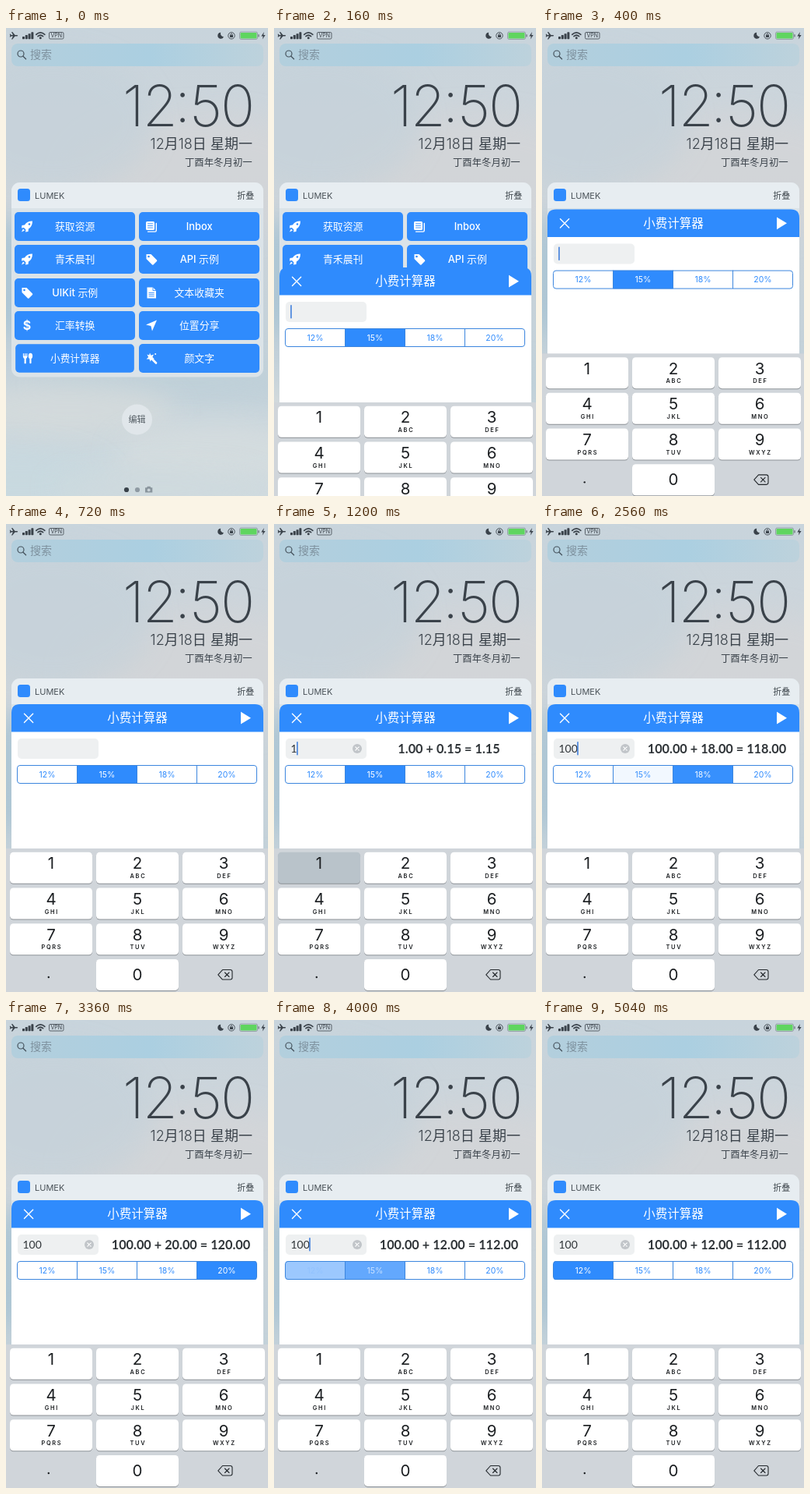
An HTML page that plays this animation: 337 px wide and 600 px high, repeating every 5120 ms.

```html
<!DOCTYPE html>
<html lang="zh-CN">
<head>
<meta charset="utf-8">
<style>
html, body { margin: 0; width: 100%; height: 100%; overflow: hidden; background: #cbd3d9; }
svg { display: block; width: 337px; height: 600px; font-family: Inter, "Noto Sans CJK SC", "Noto Sans CJK", sans-serif; }
.lato { font-family: Lato, "Noto Sans CJK SC", sans-serif; }
</style>
</head>
<body>
<svg id="stage" viewBox="0 0 337 600"></svg>
<script>
const BLUE = '#2f8bfd', INK = '#3a424a', LOOP = 5120, STEP = 80;
const stage = document.getElementById('stage');
const $ = id => document.getElementById(id);

const text = (x, y, size, s, fill = INK, attrs = '') =>
  `<text x="${x}" y="${y}" font-size="${size}" fill="${fill}" ${attrs}>${s}</text>`;
const mid = (x, y, size, s, fill, attrs = '') =>
  text(x, y, size, s, fill, 'text-anchor="middle" ' + attrs);
const end = (x, y, size, s, fill, attrs = '') =>
  text(x, y, size, s, fill, 'text-anchor="end" ' + attrs);
const rect = (x, y, w, h, r, fill, attrs = '') =>
  `<rect x="${x}" y="${y}" width="${w}" height="${h}" rx="${r}" fill="${fill}" ${attrs}/>`;
const path = (d, fill = 'none', attrs = '') => `<path d="${d}" fill="${fill}" ${attrs}/>`;
const circle = (x, y, r, fill, attrs = '') =>
  `<circle cx="${x}" cy="${y}" r="${r}" fill="${fill}" ${attrs}/>`;
const line = (d, color, w = 1) =>
  path(d, 'none', `stroke="${color}" stroke-width="${w}" stroke-linecap="round" stroke-linejoin="round"`);

// Soft sky: [cx, cy, rx, ry, colour, opacity]
const clouds = [
  [0, 320, 60, 75, '#a5c2d3', .7], [250, 190, 170, 80, '#d4d5d8', .7],
  [60, 120, 130, 90, '#c5d2da', .7], [230, 455, 190, 22, '#bccfd8', .7],
  [80, 490, 140, 34, '#d6dbdc', .8], [270, 545, 130, 40, '#d6dddf', .8],
  [20, 580, 110, 40, '#c6d9e0', .7], [200, 590, 140, 26, '#cfdade', .8]
];
const sky = () => `<defs>
  <linearGradient id="sky" x2="0" y2="1">
    <stop stop-color="#c8d4dc"/><stop offset=".3" stop-color="#cfd5da"/>
    <stop offset=".7" stop-color="#c3d1d9"/><stop offset="1" stop-color="#cfdadf"/>
  </linearGradient>
  <linearGradient id="search">
    <stop stop-color="#b3cfdd"/><stop offset=".55" stop-color="#abcfe1"/><stop offset="1" stop-color="#bdd2dc"/>
  </linearGradient>
  <filter id="soft" x="-50%" y="-100%" width="200%" height="300%"><feGaussianBlur stdDeviation="16"/></filter>
  <clipPath id="card">${rect(7, 198, 324, 249.5, 11, '#fff')}</clipPath>
  <clipPath id="pill">${rect(14.5, 309, 308.5, 24, 3.5, '#fff')}</clipPath>
  </defs>` + rect(0, 0, 337, 600, 0, 'url(#sky)') +
  clouds.map(([x, y, rx, ry, c, o]) =>
    `<ellipse cx="${x}" cy="${y}" rx="${rx}" ry="${ry}" fill="${c}" opacity="${o}" filter="url(#soft)"/>`).join('');

const statusBar = () =>
  path('M5 9 L9 9 L7 5 H8.3 L11.6 9 H14.5 Q16 9.7 14.5 10.4 H11.6 L8.3 14.4 H7 L9 10.4 H6.8 L5.7 11.6 H4.8 L5.3 9.7 L4.8 7.8 H5.7 L6.8 9Z', INK) +
  [0, 1, 2, 3].map(i => rect(21 + i * 3.8, 11 - i * 1.9, 3, 3.2 + i * 1.9, .6, INK)).join('') +
  line('M38.8 8.4 Q44.3 3.4 49.8 8.4 M41 10.7 Q44.3 7.8 47.6 10.7', INK, 1.7) + circle(44.3, 12.8, 1.5, INK) +
  rect(55.5, 5.5, 18.5, 8.5, 1.5, 'none', `stroke="${INK}" stroke-width=".8"`) +
  mid(64.8, 12.4, 7, 'VPN', INK) +
  path('M276.2 5.8 A4 4 0 1 0 280 11.3 A4.1 4.1 0 0 1 276.2 5.8Z', INK) +
  circle(290, 9.8, 4.2, 'none', `stroke="${INK}" stroke-width=".9"`) + rect(288, 9, 4, 3, .5, INK) +
  line('M288.8 9 V8 Q290 6.4 291.2 8 V9', INK, .8) +
  rect(300.5, 5, 23, 9.5, 2, 'none', `stroke="${INK}" stroke-width=".7" opacity=".5"`) +
  rect(301.5, 6, 21, 7.5, 1.2, '#5fd55f') + rect(324.3, 8, 1.4, 3.6, .7, INK, 'opacity=".6"') +
  path('M332 5 L328.3 10.4 H330.7 L329.8 14.6 L333.6 9 H331.1Z', INK);

const clock = 'font-weight="160" letter-spacing="-2"';
const lockScreen = () =>
  rect(7, 20, 324, 29, 8, 'url(#search)') +
  circle(19, 33, 4, 'none', 'stroke="#46535d" stroke-width="1.2"') + line('M22 36.2 L25.6 39.8', '#46535d', 1.3) +
  text(31, 39, 14, '搜索', '#7e919e') +
  mid(184.5, 126, 73, '12', INK, clock) +
  mid(227, 121, 73, ':', INK, 'font-weight="160"') +
  mid(277.5, 126, 73, '50', INK, clock) +
  end(316.9, 155, 18, '12月18日 星期一', INK, 'font-weight="350"') +
  end(316.7, 177, 12.4, '丁酉年冬月初一') +
  circle(168.5, 502, 19.5, '#e3e9ed', 'opacity=".85"') + mid(168.5, 506, 11, '编辑', '#515a61') +
  circle(155, 592, 3.1, '#39424a') + circle(169, 592, 3.1, '#8f9aa3') +
  path('M179 589.3 H181 L182 587.8 H185.5 L186.5 589.3 H188.3 V595.5 H179Z', '#8a959d') +
  circle(183.7, 592.3, 1.9, '#cbd4d9');

// Icons are drawn around (0, 0)
const W = '#fff';
const icons = {
  rocket: path('M7 -7 Q0 -7 -3 -2 L-6.5 -1.5 L-7 2 L-4 1.5 L-1.5 4 L-2 7 L1.5 6.5 L2 3 Q7 0 7 -7Z M-5 3 L-7 7 L-3 5Z', W) + circle(3, -3, 1.3, BLUE),
  inbox: rect(-7, -6.5, 11, 11, 1.5, W) + line('M6.3 -4 V5 Q6.3 6.6 4.7 6.6 H-4.5', W, 1.4) +
    line('M-4.5 -3.6 H1.5 M-4.5 -1 H1.5 M-4.5 1.6 H1.5', BLUE, .9),
  tag: path('M-6.5 -6.5 H-.5 L7 1 Q7.6 1.8 7 2.5 L2.5 7 Q1.8 7.6 1 7 L-6.5 -.5Z', W) + circle(-3.5, -3.5, 1.3, BLUE),
  doc: path('M-5.5 -7 H2 L6 -3 V7 H-5.5Z', W) + line('M2 -6.8 V-2.9 H5.8 M-3 0 H3.3 M-3 2.2 H3.3 M-3 4.4 H3.3', BLUE, .9),
  dollar: mid(0, 5.6, 16, '$', W, 'font-weight="700"'),
  arrow: path('M7 -7 L1 7 L-.6 .6 L-7 -1Z', W),
  cutlery: line('M-5.5 -6 V-2 M-3.3 -6 V-2 M-1.1 -6 V-2', W, 1.2) + path('M-6.1 -3 H-.5 Q-.6 0 -2.2 .4 V6.8 H-4.4 V.4 Q-6 0 -6.1 -3Z', W) +
    '<ellipse cx="3.6" cy="-3" rx="2.7" ry="3.8" fill="#fff"/>' + rect(2.5, 0, 2.2, 6.8, 1, W),
  wand: line('M0 0 L6 6', W, 2.6) + path('M-2 -7 L-.5 -3.8 L3 -5 L1.4 -1.6 L4 .8 L.3 .7 L-1.2 4.2 L-2.6 .9 L-6.4 1 L-3.8 -1.6 L-5.6 -5 L-2.8 -3.9Z', W) + circle(5.2, -5.5, 1, W)
};
const actions = [
  ['rocket', '获取资源'], ['inbox', 'Inbox'], ['rocket', '青禾晨刊'], ['tag', 'API 示例'],
  ['tag', 'UIKit 示例'], ['doc', '文本收藏夹'], ['dollar', '汇率转换'], ['arrow', '位置分享'],
  ['cutlery', '小费计算器'], ['wand', '颜文字']
];
const button = ([icon, label], i) => {
  const x = i % 2 ? 248.5 : 88.5, y = 254.5 + Math.round((i >> 1) * 42.35);
  return `<g transform="translate(${x} ${y})${i === 8 ? ' scale(.985)' : ''}">` +
    rect(-77.5, -18.5, 155, 37, 5, BLUE) +
    `<g transform="translate(-61.5 0)">${icons[icon]}</g>` +
    mid(.2, 4.8, 12.9, label, W, 'font-weight="500"') + '</g>';
};
const widget = () =>
  `<g clip-path="url(#card)">${rect(7, 198, 324, 250, 0, '#dbe3e8')}${rect(7, 198, 324, 33, 0, '#e7edf1')}</g>` +
  rect(15, 206, 16, 16, 3.5, BLUE) + text(37, 218.5, 11, 'LUMEK', '#4a5258') +
  end(319.3, 218.5, 11, '折叠', '#3f474d') + actions.map(button).join('');

const rates = [12, 15, 18, 20], segW = 77;
const sheet = () => '<g id="sheet">' +
  rect(7, 260, 324, 340, 0, W) +
  path('M7 266.5 V242 Q7 231 18 231 H320 Q331 231 331 242 V266.5Z', BLUE) +
  line('M23.5 243.2 L34.7 254.4 M34.7 243.2 L23.5 254.4', W, 1.4) +
  mid(169, 254.4, 15.5, '小费计算器', W, 'font-weight="500"') +
  path('M302 240.8 L315 248.7 L302 256.6Z', W) +
  rect(15, 275, 104, 26, 5, '#eef0f1') +
  text(21.5, 293, 14, '', '#2f3438', 'id="amount" class="lato"') +
  rect(21, 279, 1.6, 17.5, .8, '#3f7fdc', 'id="caret"') +
  `<g id="clear">${circle(107, 288, 6, '#c1c5c9')}${line('M104.8 285.8 L109.2 290.2 M109.2 285.8 L104.8 290.2', W, 1.2)}</g>` +
  mid(225, 294.3, 16.3, '', '#2f3438', 'id="sum" class="lato" font-weight="700"') +
  '<g clip-path="url(#pill)">' + rates.map((r, i) => rect(14.5 + i * segW, 309, segW, 24, 0, BLUE, `id="seg${i}"`)).join('') + '</g>' +
  rect(14.5, 309.5, 308, 23, 3.5, 'none', 'stroke="#3c86de"') +
  [1, 2, 3].map(i => line(`M${14.5 + i * segW} 309.5 V332`, '#3c86de')).join('') +
  rates.map((r, i) => mid(53 + i * segW, 324.6, 10.5, r + '%', BLUE, `id="rate${i}"`)).join('') +
  '</g>';

const letters = ['', 'ABC', 'DEF', 'GHI', 'JKL', 'MNO', 'PQRS', 'TUV', 'WXYZ'];
const key = (digit, col, row, sub) => {
  const x = 5 + col * 111, y = 420.8 + row * 45.7;
  return rect(x, y + 1, 106, 40, 4.5, '#8d9297') + rect(x, y, 106, 40, 4.5, W, `id="key${digit}"`) +
    mid(x + 53, y + (digit ? 21.5 : 27.2), 20.5, digit, '#1c1f22') +
    mid(x + 53.9, y + 33, 7.4, sub, '#1c1f22', 'font-weight="600" letter-spacing="1.7"');
};
const keyboard = () => '<g id="keyboard">' + rect(0, 416, 337, 184, 0, '#d0d5da') +
  letters.map((s, i) => key(i + 1, i % 3, Math.floor(i / 3), s)).join('') + key(0, 1, 3, '') +
  circle(54.8, 581, 1.2, '#1c1f22') +
  line('M278.5 571.5 H288.5 Q291 571.5 291 574 V581.5 Q291 584 288.5 584 H278.5 L272.8 577.8Z M281.5 575 L287 580.5 M287 575 L281.5 580.5', '#23282c', 1.1) +
  '</g>';

stage.innerHTML = sky() + lockScreen() + widget() + sheet() + keyboard() + statusBar();

// Taps: [key, down, up] and [segment, time]
const presses = [[1, 1120, 1260], [0, 1360, 1470], [0, 1560, 1660]];
const picks = [[1, -999], [2, 2410], [3, 2920], [1, 3480], [0, 3960]];
const show = (id, on) => $(id).setAttribute('visibility', on ? 'visible' : 'hidden');
const move = (id, dy) => $(id).setAttribute('transform', `translate(0 ${dy.toFixed(2)})`);
const mix = a => `rgb(${[47, 139, 253].map(c => Math.round(c + (255 - c) * a))})`;

function draw(t) {
  const rise = Math.exp((160 - t) / 62);
  move('sheet', t < 80 ? 400 : 76 * rise);
  move('keyboard', t < 80 ? 200 : Math.min(200, 64 * rise));

  const typed = presses.filter(p => t >= p[1]).map(p => p[0]).join('');
  for (const digit of [0, 1]) {
    const down = presses.some(([k, a, b]) => k === digit && t >= a && t < b);
    $('key' + digit).setAttribute('fill', down ? '#b9c3ca' : W);
  }
  $('amount').textContent = typed;
  show('clear', typed);
  $('caret').setAttribute('x', 21.2 + typed.length * 8);
  const phase = t % 1000;
  show('caret', t < 1700 ? t < 700 || t >= 1080 : phase >= 500 || phase < 30);

  const n = picks.filter(p => t >= p[1]).length - 1;
  const [now, since] = picks[n], before = n ? picks[n - 1][0] : -1;
  const p = Math.min(1, (t - since) / 160);
  rates.forEach((r, i) => {
    const a = i === now ? .3 + .7 * p : i === before ? 1 - p : 0;
    $('seg' + i).setAttribute('opacity', a);
    $('rate' + i).setAttribute('fill', mix(a));
  });

  const bill = +typed, tip = bill * rates[now] / 100;
  $('sum').textContent = typed && `${bill.toFixed(2)} + ${tip.toFixed(2)} = ${(bill + tip).toFixed(2)}`;
}

const start = performance.now();
function tick() {
  const t = (performance.now() - start) % LOOP;
  draw(Math.floor(t / STEP) * STEP);
  requestAnimationFrame(tick);
}
tick();
</script>
</body>
</html>
```
